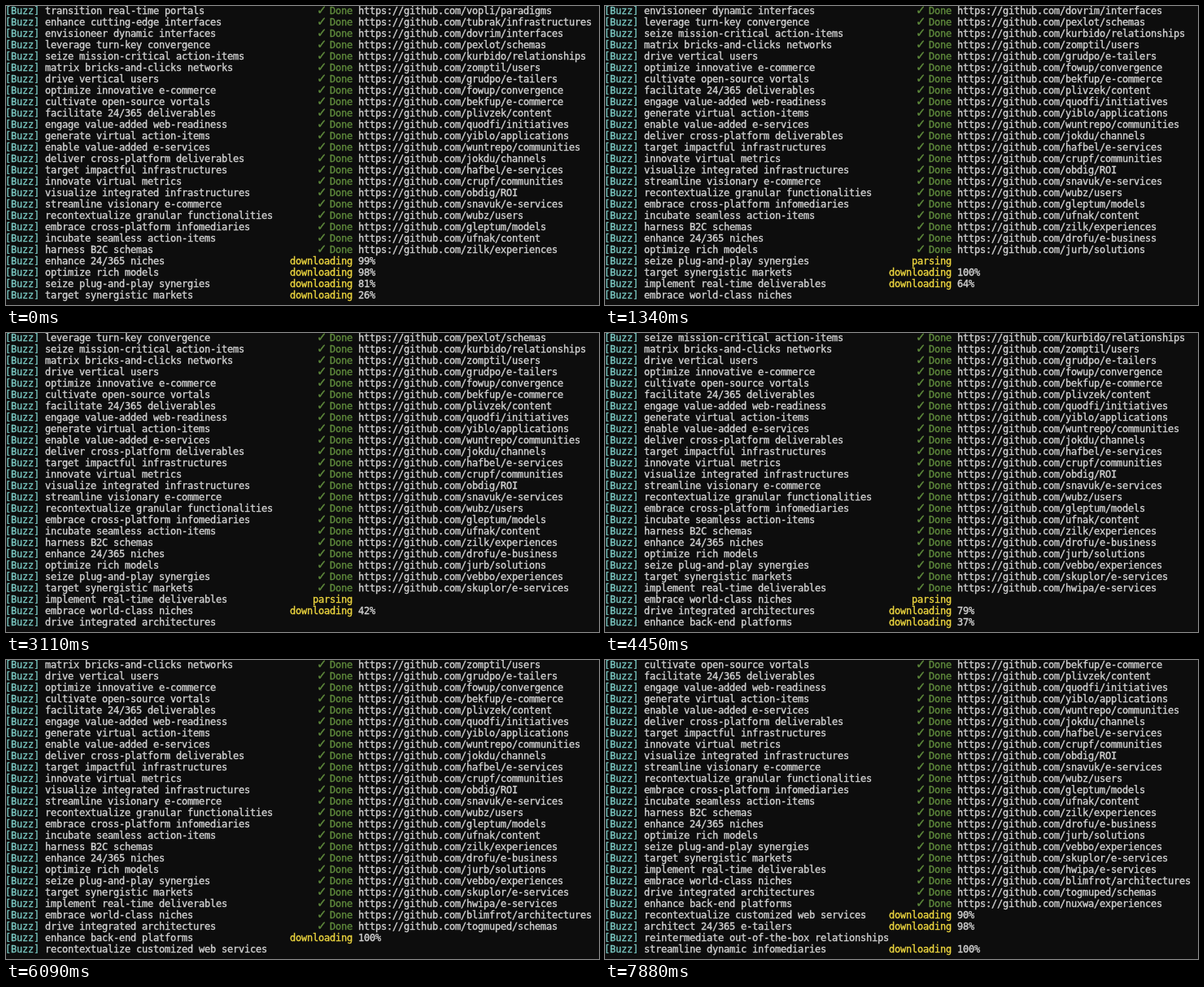
Recreate the animation shown at these times as an HTML page. Size 729 by 368 pixels, loop 8000 ms.

```html
<!DOCTYPE html>
<html lang="en">
<head>
<meta charset="utf-8">
<title>Terminal job log</title>
<style>
  html, body { margin: 0; width: 100%; height: 100%; overflow: hidden; background: #0d0d0d; }
  #log {
    position: absolute; left: -1px; top: -1px; white-space: pre; color: #d2d2d2;
    font: 12px/14px "DejaVu Sans Mono", monospace; letter-spacing: calc(7px - 1ch);
    font-variant-ligatures: none; -webkit-text-stroke: 0.35px;
  }
  #log div { height: 14px; }
  .tag { color: #78c5bf; }
  .busy { color: #ecd53f; }
  .done { color: #5f8a3c; }
  .tick {
    display: inline-block; width: 7px; margin: 0 2px 0 -2px;
    font: 15px/0 "DejaVu Sans", sans-serif; letter-spacing: 0;
  }
</style>
</head>
<body>
<div id="log"></div>
<script>
const LOOP = 8000, TICK = 148, ROWS = 26, PARSE_DELAY = 2;

const finished = `transition real-time portals|vopli/paradigms
enhance cutting-edge interfaces|tubrak/infrastructures
envisioneer dynamic interfaces|dovrim/interfaces
leverage turn-key convergence|pexlot/schemas
seize mission-critical action-items|kurbido/relationships
matrix bricks-and-clicks networks|zomptil/users
drive vertical users|grudpo/e-tailers
optimize innovative e-commerce|fowup/convergence
cultivate open-source vortals|bekfup/e-commerce
facilitate 24/365 deliverables|plivzek/content
engage value-added web-readiness|quodfi/initiatives
generate virtual action-items|yiblo/applications
enable value-added e-services|wuntrepo/communities
deliver cross-platform deliverables|jokdu/channels
target impactful infrastructures|hafbel/e-services
innovate virtual metrics|crupf/communities
visualize integrated infrastructures|obdig/ROI
streamline visionary e-commerce|snavuk/e-services
recontextualize granular functionalities|wubz/users
embrace cross-platform infomediaries|gleptum/models
incubate seamless action-items|ufnak/content
harness B2C schemas|zilk/experiences`.split('\n').map(line => {
  const [title, repo] = line.split('|');
  return { title, repo, added: 0, done: 0 };
});

// Downloads grow by `speed` percent per tick, then parse for `parsing` ticks
function job(title, repo, added, start = Infinity, from = 0, speed = 1, parsing = Infinity) {
  const parse = start + Math.ceil((100 - from) / speed) + PARSE_DELAY;
  return { title, repo, added, start, from, speed, parse, done: parse + parsing };
}

const jobs = [
  ...finished,
  job('enhance 24/365 niches', 'drofu/e-business', 0, 0, 99, 1, 5),
  job('optimize rich models', 'jurb/solutions', 0, 0, 98, 2, 2),
  job('seize plug-and-play synergies', 'vebbo/experiences', 0, 0, 81, 6.5, 8),
  job('target synergistic markets', 'skuplor/e-services', 0, 0, 26, 9.67, 1),
  job('implement real-time deliverables', 'hwipa/e-services', 6, 9, 64, 4, 3),
  job('embrace world-class niches', 'blimfrot/architectures', 9, 18, 17, 8.4, 3),
  job('drive integrated architectures', 'togmuped/schemas', 21, 26, 51, 7, 3),
  job('enhance back-end platforms', 'nuxwa/experiences', 24, 27, 20, 5.72, 8),
  job('recontextualize customized web services', '', 35, 47, 24, 11),
  job('architect 24/365 e-tailers', '', 44, 50, 56, 14),
  job('reintermediate out-of-the-box relationships', '', 46),
  job('streamline dynamic infomediaries', '', 53, 53, 100),
];

const span = (cls, text) => `<span class="${cls}">${text}</span>`;

function status({ repo, start, from, speed, parse, done }, tick) {
  if (tick >= done)
    return '     ' + span('done', span('tick', '✓') + ' Done') + ' https://github.com/' + repo;
  if (tick >= parse) return span('busy', 'parsing'.padStart(11));
  if (tick < start) return '';
  const percent = Math.min(100, Math.round(from + speed * (tick - start)));
  return span('busy', 'downloading') + ` ${percent}%`;
}

const row = (item, tick) =>
  `<div>${span('tag', '[Buzz]')} ${item.title.padEnd(43)}${status(item, tick)}</div>`;

const log = document.getElementById('log');
let shown = -1;

function frame() {
  const tick = Math.floor(performance.now() % LOOP / TICK);
  if (tick !== shown) {
    shown = tick;
    log.innerHTML = jobs.filter(item => item.added <= tick).slice(-ROWS)
      .map(item => row(item, tick)).join('');
  }
  requestAnimationFrame(frame);
}
frame();
</script>
</body>
</html>
```
